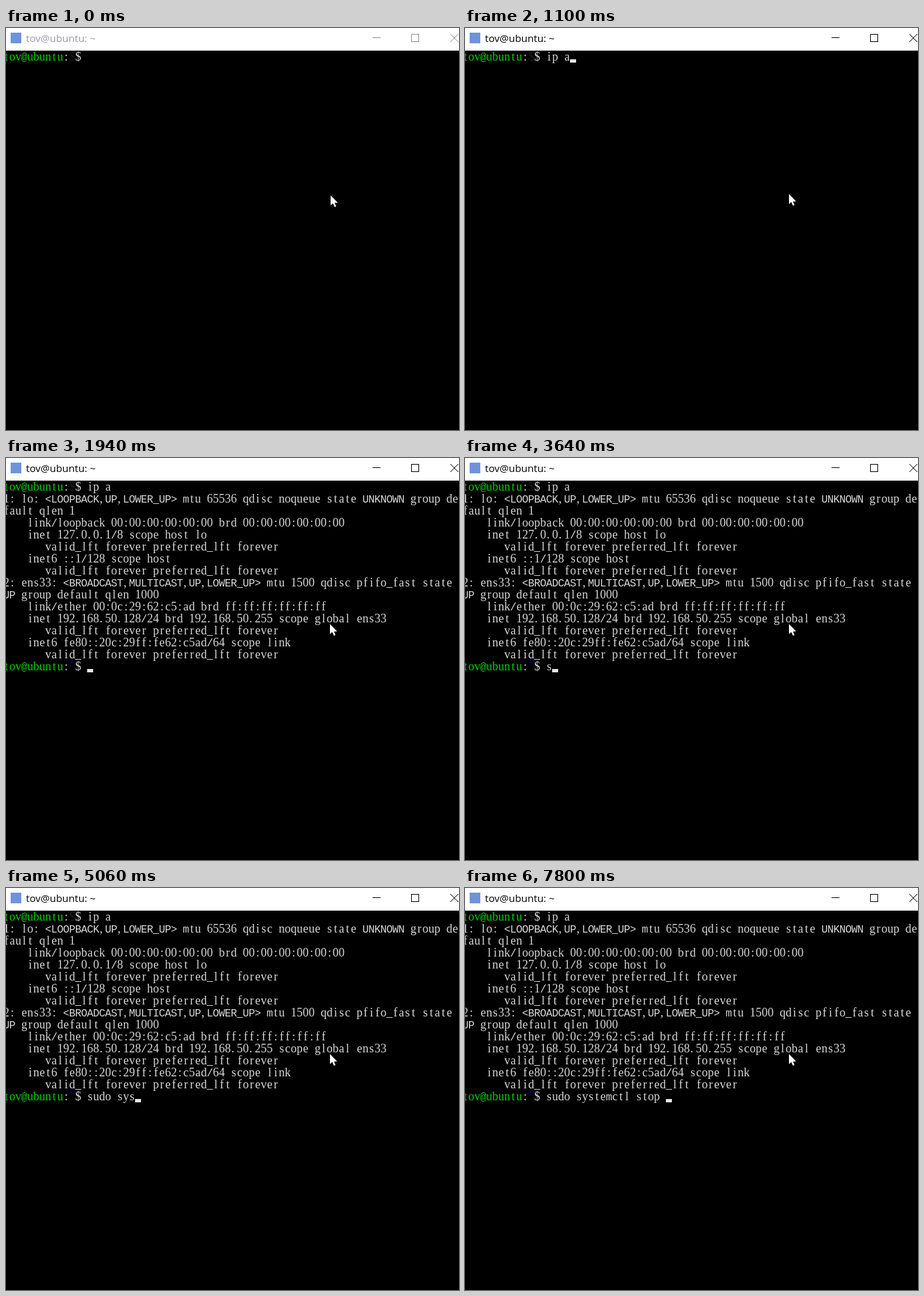
Animation of 681x604 px, one loop 8000 ms. Source, as an HTML page with a canvas:

```html
<!DOCTYPE html>
<html lang="en">
<head>
<meta charset="utf-8">
<title>Terminal</title>
<style>
  html, body { margin: 0; width: 100%; height: 100%; overflow: hidden; background: #000; }
  canvas { display: block; }
</style>
</head>
<body>
<canvas id="stage" width="681" height="604"></canvas>
<script>
const ctx = document.getElementById('stage').getContext('2d');
const LOOP = 8000;
const CELL = 9, LINE = 18, LEFT = -4, TOP = 34;
const GREEN = '#00d000', GRAY = '#d8d8d8';
const SERIF = '18px "Liberation Serif", serif';
const MONO = '16px "Liberation Mono", monospace';
const HOST = 'tov@ubuntu';
const OUTPUT_AT = 1340;
const PROMPT_ROW = 15;

const output = `1: lo: <LOOPBACK,UP,LOWER_UP> mtu 65536 qdisc noqueue state UNKNOWN group de
fault qlen 1
    link/loopback 00:00:00:00:00:00 brd 00:00:00:00:00:00
    inet 127.0.0.1/8 scope host lo
       valid_lft forever preferred_lft forever
    inet6 ::1/128 scope host
       valid_lft forever preferred_lft forever
2: ens33: <BROADCAST,MULTICAST,UP,LOWER_UP> mtu 1500 qdisc pfifo_fast state
UP group default qlen 1000
    link/ether 00:0c:29:62:c5:ad brd ff:ff:ff:ff:ff:ff
    inet 192.168.50.128/24 brd 192.168.50.255 scope global ens33
       valid_lft forever preferred_lft forever
    inet6 fe80::20c:29ff:fe62:c5ad/64 scope link
       valid_lft forever preferred_lft forever`.split('\n');

// One key time per character.
const first = { text: 'ip a', keys: [630, 700, 940, 1100] };
const second = {
  text: 'sudo systemctl stop ',
  keys: [3640, 3710, 3890, 4020, 4260, 4730, 4970, 5060, 5380, 5450,
         5680, 6080, 6380, 6380, 6380, 6940, 7260, 7410, 7480, 7800]
};

const typed = (command, t) =>
  command.text.slice(0, command.keys.filter(key => key <= t).length);

// Serif letters on a half-em grid; glyphs too wide for a cell use the mono face.
function print(text, column, row, color) {
  ctx.fillStyle = color;
  ctx.textAlign = 'center';
  [...text].forEach((char, i) => {
    ctx.font = /[A-Zmw@<>\/]/.test(char) ? MONO : SERIF;
    const center = /[.,]/.test(char) ? 3 : CELL / 2;
    ctx.fillText(char, LEFT + (column + i) * CELL + center, TOP + 15 + row * LINE);
  });
}

function prompt(row, command) {
  print(HOST, 0, row, GREEN);
  print(':', 10, row, GRAY);
  print('$ ' + command, 12, row, GRAY);
}

function tilde(row) {
  const y = TOP + row * LINE + 2.5;
  strokePath('#0000c8', [[96, y + 1], [98, y - 1], [101, y + 1], [103, y - 1]]);
}

function caret(column, row) {
  ctx.fillStyle = '#e6e6e6';
  ctx.fillRect(LEFT + column * CELL, TOP + 13 + row * LINE, CELL, 5);
}

function trace(points) {
  ctx.beginPath();
  points.forEach(([x, y]) => ctx.lineTo(x, y));
}

function strokePath(color, points) {
  trace(points);
  ctx.strokeStyle = color;
  ctx.lineWidth = 1;
  ctx.stroke();
}

function titleBar(active) {
  ctx.fillStyle = '#fff';
  ctx.fillRect(0, 0, 681, TOP);
  ctx.fillStyle = '#6f93d8';
  ctx.fillRect(7, 7, 16, 16);
  ctx.fillStyle = active ? '#000' : '#9a9ba8';
  ctx.font = '15.3px "Open Sans", sans-serif';
  ctx.textAlign = 'left';
  ctx.fillText(HOST + ': ~', 30, 21);

  const ink = active ? '#000' : '#8c8c8c';
  strokePath(ink, [[551, 14.5], [563, 14.5]]);
  ctx.strokeRect(609.5, 9.5, 11, 11);
  strokePath(ink, [[668, 9], [680, 21]]);
  strokePath(ink, [[680, 9], [668, 21]]);
}

function pointer(x, y) {
  trace([[0, 0], [0, 15], [3.5, 12], [6, 17.5], [8.4, 16.5], [6, 11.2], [10.8, 11]]
    .map(([dx, dy]) => [x + dx, y + dy]));
  ctx.closePath();
  ctx.strokeStyle = '#000';
  ctx.lineWidth = 2;
  ctx.stroke();
  ctx.fillStyle = '#fff';
  ctx.fill();
}

function draw(t) {
  ctx.fillStyle = '#000';
  ctx.fillRect(0, 0, 681, 604);
  titleBar(t >= 80);

  const firstText = typed(first, t);
  prompt(0, firstText);
  print('$', 11, 0, '#1c1c1c');
  if (t >= OUTPUT_AT) {
    output.forEach((line, i) => print(line, 0, i + 1, GRAY));
    const secondText = typed(second, t);
    prompt(PROMPT_ROW, secondText);
    tilde(PROMPT_ROW);
    caret(14 + secondText.length, PROMPT_ROW);
  } else if (firstText) {
    caret(14 + firstText.length, 0);
  }

  if (t < 80) pointer(488, 251.5);
  else pointer(487, t < 160 ? 250.5 : 249.5);
}

function frame() {
  draw(performance.now() % LOOP);
  requestAnimationFrame(frame);
}
frame();
</script>
</body>
</html>
```
